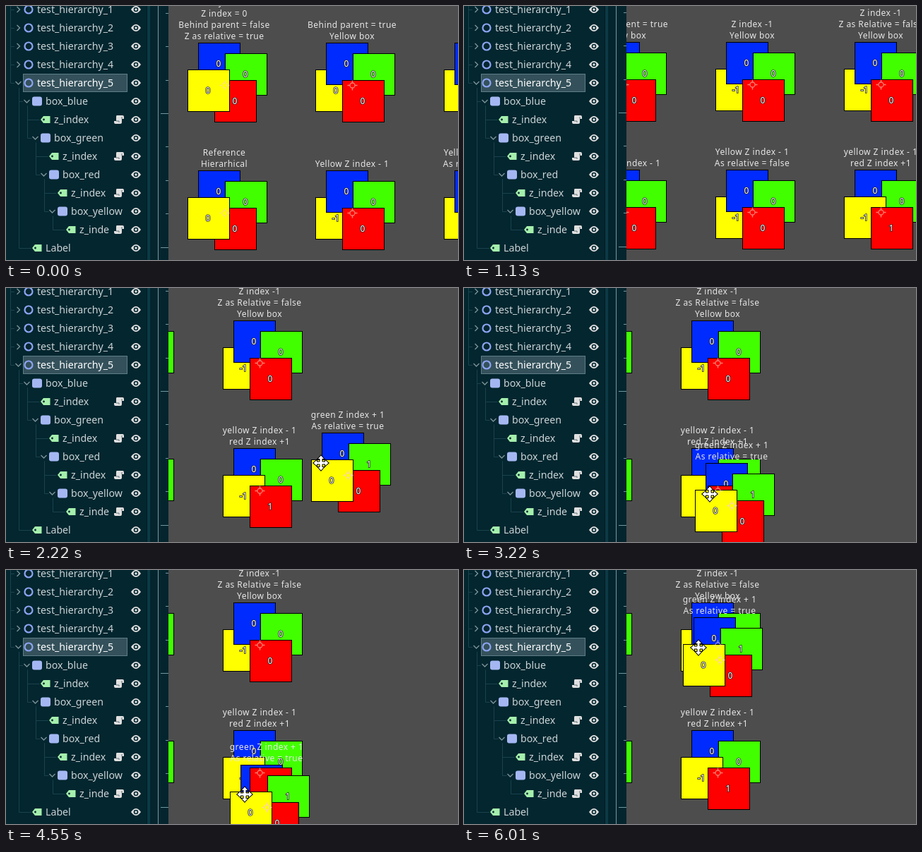
Animation, 640 px wide and 360 px high, one loop 6.04 s. Source, as an HTML page:

```html
<!DOCTYPE html>
<html lang="en">
<head>
<meta charset="utf-8">
<title>Z index demo</title>
<style>
  html, body { margin: 0; width: 100%; height: 100%; overflow: hidden; background: #03262f; }
  svg { display: block; }
  text { font-family: "Noto Sans", sans-serif; }
  .row { font-size: 14.2px; fill: #cbd4d6; }
  .row.on { fill: #fff; }
  .title { font-size: 12px; letter-spacing: .45px; fill: #e6e6e6; text-anchor: middle; }
  .num { font-size: 12px; fill: #fff; stroke: #222; stroke-width: 1.6px; paint-order: stroke; text-anchor: middle; }
  .guide { stroke: #1b424d; fill: none; }
  .arrow { stroke: #7d9399; stroke-width: 1.4; fill: none; }
</style>
</head>
<body>
<svg id="stage" width="640" height="360" viewBox="0 0 640 360">
  <rect width="640" height="360" fill="#03262f"/>
  <g id="tree"></g>
  <rect x="199" width="5" height="360" fill="#0b3a45"/>
  <rect x="199" width="1" height="360" fill="#021a21"/>
  <rect x="204" width="26" height="360" fill="#04252e"/>
  <rect x="215" width="1" height="360" fill="#6f99a2"/>
  <g id="ruler"></g>
  <svg id="view" x="230" width="410" height="360" viewBox="230 0 410 360">
    <rect x="230" width="410" height="360" fill="#4d4d4d"/>
  </svg>
</svg>
<script>
const LOOP = 6040;
const $ = id => document.getElementById(id);

function add(parent, tag, attrs = {}, text) {
  const node = document.createElementNS("http://www.w3.org/2000/svg", tag);
  for (const k in attrs) node.setAttribute(k, attrs[k]);
  if (text !== undefined) node.textContent = text;
  return parent.appendChild(node);
}
const group = (parent, x = 0, y = 0) => add(parent, "g", { transform: `translate(${x} ${y})` });
const place = (node, x, y) => node.setAttribute("transform", `translate(${x} ${y})`);

// --- scene tree ---
const ICONS = {
  ring(g) { add(g, "circle", { r: 5.5, fill: "none", stroke: "#8da5f3", "stroke-width": 2.2 }); },
  sprite(g) { add(g, "rect", { x: -7, y: -6.5, width: 14, height: 13, rx: 3, fill: "#a5b7f3" }); },
  tag(g) {
    add(g, "path", { d: "M-7 0L-3-5H6.5V5H-3Z", fill: "#a5efac", "stroke-linejoin": "round" });
    add(g, "circle", { cx: -2.5, r: 1.4, fill: "#03262f" });
  },
  script(g) {
    add(g, "path", { d: "M-3-6H5Q7-6 7-4V-1H4V4Q4 6 2 6H-5Q-7 6-7 4V2H-4V-4Q-4-6-3-6Z", fill: "#e0e0e0" });
    add(g, "path", { d: "M4-1V-4M-4 2H0V4", fill: "none", stroke: "#62757b" });
  },
  eye(g) {
    add(g, "path", { d: "M-7 0Q0-10 7 0Q0 10-7 0Z", fill: "#e0e0e0" });
    add(g, "circle", { r: 3.3, fill: "#03262f" });
    add(g, "circle", { r: 1.7, fill: "#e0e0e0" });
  }
};

// label, icon, icon x, arrow
const ROWS = [
  ["test_hierarchy_1", "ring", 32, ">"], ["test_hierarchy_2", "ring", 32, ">"],
  ["test_hierarchy_3", "ring", 32, ">"], ["test_hierarchy_4", "ring", 32, ">"],
  ["test_hierarchy_5", "ring", 32, "v"],
  ["box_blue", "sprite", 44, "v"], ["z_index", "tag", 56],
  ["box_green", "sprite", 56, "v"], ["z_index", "tag", 68],
  ["box_red", "sprite", 68, "v"], ["z_index", "tag", 80],
  ["box_yellow", "sprite", 80, "v"], ["z_inde", "tag", 92],
  ["Label", "tag", 44]
];

function buildTree(tree) {
  let guides = "M6.5 0V109.5M18.5 116V343.5H36M18.5 135.5H24";
  for (let i = 0; i < 5; i++) guides += `M6.5 ${5.5 + 26 * i}H12`;
  for (let i = 0; i < 4; i++) {
    const x = 30.5 + 12 * i, y = 141.5 + 52 * i;
    guides += `M${x} ${y}V${y + 20}H${x + 17}`;
    if (i < 3) guides += `M${x} ${y}V${y + 46}H${x + 6}`;
  }
  add(tree, "path", { d: guides, class: "guide" });
  add(tree, "rect", { x: 24.5, y: 96.5, width: 147, height: 25, fill: "#34515b", stroke: "#5f7d86" });

  ROWS.forEach(([label, icon, x, arrow], i) => {
    const y = 5 + 26 * i;
    ICONS[icon](group(tree, x, y));
    ICONS.eye(group(tree, 184, y));
    if (label.startsWith("z_")) ICONS.script(group(tree, 160, y));
    if (arrow) {
      const d = arrow === ">" ? "M-2-4L2 0L-2 4" : "M-4-2L0 2L4-2";
      add(group(tree, x - 14.5, y), "path", { d, class: "arrow" });
    }
    add(tree, "text", { x: x + 12, y: y + 5, class: i === 4 ? "row on" : "row" }, label);
  });
}

// --- box clusters ---
const BOX = {
  b: [-38, -60, "#002bff"],
  g: [0, -45, "#42ff00"],
  r: [-15, -7, "#ff0000"],
  y: [-53, -22, "#ffff00"]
};

function boxes(g, order, nums = {}) {
  for (const c of order) {
    const [x, y, fill] = BOX[c];
    add(g, "rect", { x: x + .5, y: y + .5, width: 59, height: 59, fill, stroke: "#000" });
    add(g, "text", { x: x + 29, y: y + 33.5, class: "num" }, nums[c] ?? "0");
  }
}
function title(g, lines) {
  lines.forEach((s, i) =>
    add(g, "text", { x: -1, y: -65 - 16 * (lines.length - 1 - i), class: "title" }, s));
}
function cross(g, opacity) {
  const c = add(g, "g", { stroke: "#ffd0b8", fill: "none", opacity, transform: "translate(-.5 .5)" });
  add(c, "circle", { r: 3.5, "stroke-width": 1.3 });
  add(c, "path", { d: "M-7 0H-3.5M3.5 0H7M0-7V-3.5M0 3.5V7", "stroke-width": 1.5 });
}

const COLS = [0, 181, 363, 545], ROW2 = 181;
// column, row offset, title, draw order, numbers
const CLUSTERS = [
  [0, 0, ["Any box", "Z index = 0", "Behind parent = false", "Z as relative = true"], "bgry"],
  [1, 0, ["Behind parent = true", "Yellow box"], "ybgr"],
  [2, 0, ["Z index -1", "Yellow box"], "ybgr", { y: "-1" }],
  [3, 0, ["Z index -1", "Z as Relative = false", "Yellow box"], "ybgr", { y: "-1" }],
  [0, ROW2, ["Reference", "Hierarhical"], "bgry"],
  [1, ROW2, ["Yellow Z index - 1"], "ybgr", { y: "-1" }],
  [2, ROW2, ["Yellow Z index - 1", "As relative = false"], "ybgr", { y: "-1" }],
  [3, ROW2, ["yellow Z index - 1", "red Z index +1"], "bgy", { y: "-1" }]
];

buildTree($("tree"));

const ruler = $("ruler");
for (let i = -6; i <= 6; i++) {
  add(ruler, "rect", {
    x: i % 4 ? 226 : 219, y: Math.round(115 + 47.4 * i), width: i % 4 ? 4 : 11, height: 1, fill: "#6f99a2"
  });
}

// Layers follow the z order: still boxes, dragged blue, raised red, dragged rest.
const view = $("view");
const [base, dragLow, raised, dragHigh, marks, dragMark] = Array.from({ length: 6 }, () => group(view));
for (const [col, y, lines, order, nums] of CLUSTERS) {
  const g = group(base, COLS[col], y);
  boxes(g, order, nums);
  title(g, lines);
  cross(group(marks, COLS[col], y), .6);
}
boxes(group(raised, COLS[3], ROW2), "r", { r: "1" });
title(dragLow, ["green Z index + 1", "As relative = true"]);
boxes(dragLow, "b");
boxes(dragHigh, "gry", { g: "1" });
cross(dragMark, .9);

const pointer = group(view);
const arm = "M-1.5-1.5V-6H-4L0-10.5L4-6H1.5V-1.5Z";
for (const paint of [{ stroke: "#000", "stroke-width": 2 }, { fill: "#fff" }]) {
  for (let a = 0; a < 360; a += 90) add(pointer, "path", { d: arm, transform: `rotate(${a})`, ...paint });
}
add(pointer, "rect", { x: -2, y: -2, width: 4, height: 4, fill: "#fff" });

// --- motion: time, x, y ---
const PAN = [
  [0, 310, 112], [150, 310, 112], [510, 221, 111], [1130, 46, 111],
  [1390, -41, 110], [1700, -130, 108], [1980, -185, 106]
];
const DRAG = [
  [2020, 547, 295], [2070, 533, 287], [2220, 485, 265], [2420, 413, 263], [2670, 432, 278],
  [2950, 400, 294], [3220, 380, 308], [3310, 375, 312], [3560, 373, 324], [3700, 373, 325],
  [3950, 378, 338], [4290, 387, 345], [4430, 386, 344], [4550, 370, 336], [4750, 363, 330],
  [5020, 373, 324], [5250, 393, 285], [5660, 384, 146], [5850, 371, 132], [6010, 363, 127]
];

// Monotone cubic through the keys, so turning points never overshoot.
function slope(keys, i, c) {
  if (i === 0 || i === keys.length - 1) return 0;
  const rate = j => (keys[j + 1][c] - keys[j][c]) / (keys[j + 1][0] - keys[j][0]);
  const a = rate(i - 1), b = rate(i);
  return a * b > 0 ? 2 * a * b / (a + b) : 0;
}
function at(keys, t) {
  const last = keys.length - 1;
  if (t <= keys[0][0]) return keys[0].slice(1);
  if (t >= keys[last][0]) return keys[last].slice(1);
  const i = keys.findIndex(k => k[0] > t) - 1;
  const p = keys[i], q = keys[i + 1], h = q[0] - p[0], u = (t - p[0]) / h;
  const s = u * u * (3 - 2 * u);
  return [1, 2].map(c => p[c] + (q[c] - p[c]) * s
    + h * u * (1 - u) * ((1 - u) * slope(keys, i, c) - u * slope(keys, i + 1, c)));
}

function draw(t) {
  const [px, py] = at(PAN, t).map(Math.round);
  for (const g of [base, raised, marks]) place(g, px, py);
  place(ruler, 0, py - 78 + 3);

  const [x, y] = t < 2020 ? [px + 732, py + 189] : at(DRAG, t).map(Math.round);
  for (const g of [dragLow, dragHigh, dragMark]) place(g, x, y);

  // The pointer runs slightly ahead of what it drags.
  const [mx, my] = at(DRAG, t + 20).map(Math.round);
  place(pointer, mx - 31, my - 17);
  pointer.style.display = t < 1980 ? "none" : "";
}

const start = performance.now();
function tick() {
  draw((performance.now() - start) % LOOP);
  requestAnimationFrame(tick);
}
tick();
</script>
</body>
</html>
```
